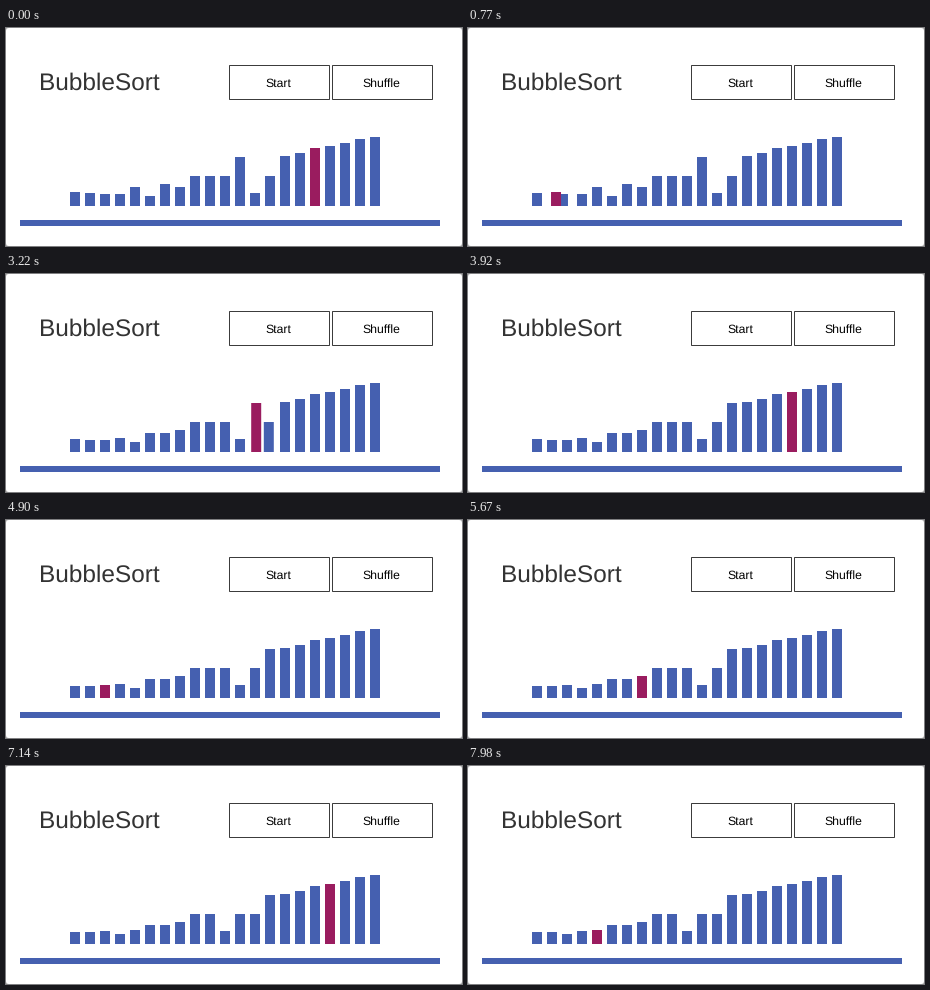
Animation, 456 px wide and 218 px high, one loop 8000 ms. Source, as a matplotlib script:

```python
import matplotlib.pyplot as plt
from matplotlib.animation import FuncAnimation
from matplotlib.patches import FancyBboxPatch, Rectangle

W, H, DPI = 456, 218, 64
LOOP, TICK, HOLD = 8000, 20, 70      # ms
STEP, SWAP_STEP, SLIDE = 112, 365, 250
BLUE, RED, INK = "#4560b0", "#9a1c5f", "#333333"
LEFT, PITCH, BAR_W, BASE = 64, 15, 10, 178

HEIGHTS = [14, 13, 12, 12, 19, 10, 22, 19, 30, 30, 30, 49, 13, 30,
           50, 53, 58, 60, 63, 67, 69]

plt.rcParams["text.hinting"] = "none"
fig = plt.figure(figsize=(W / DPI, H / DPI), dpi=DPI, facecolor="#b4b4b4")
ax = fig.add_axes([0, 0, 1, 1])
ax.set_xlim(0, W)
ax.set_ylim(H, 0)
ax.axis("off")


def label(x, y, text, px, color, align):
    ax.text(x, y, text, fontsize=px * 72 / DPI, family="Liberation Sans",
            color=color, ha=align, va="baseline")


def button(x, text):
    ax.add_patch(Rectangle((x, 37), 100, 34, fc="white", ec="#3c3c3c",
                           lw=72 / DPI, snap=True))
    label(x + 50, 58.5, text, 12.2, "black", "center")


def sort_steps(start, j):
    """List (time, index, order after the step, swapped) for the whole loop."""
    order, steps, t = list(range(len(HEIGHTS))), [], start
    while t < LOOP:
        swap = HEIGHTS[order[j - 1]] > HEIGHTS[order[j]]
        if swap:
            order[j - 1], order[j] = order[j], order[j - 1]
        steps.append((t, j, order[:], swap))
        t += SWAP_STEP if swap else STEP
        j = j + 1 if j < len(HEIGHTS) - 2 else 1
    return steps


ax.add_patch(FancyBboxPatch((0, 0), W, H, fc="white", ec="none",
                            boxstyle="round,pad=0,rounding_size=3"))
label(32.7, 62, "BubbleSort", 24.4, INK, "left")
button(222.5, "Start")
button(325.5, "Shuffle")
ax.add_patch(Rectangle((14, 192), 420, 6, fc=BLUE, ec="none"))

bars = [ax.add_patch(Rectangle((0, BASE - h), BAR_W, h, ec="none", snap=False))
        for h in HEIGHTS]
STEPS = sort_steps(-110, 16)


def draw(frame):
    now = (frame * TICK + TICK // 2) // HOLD * HOLD
    t, j, order, swap = [s for s in STEPS if s[0] <= now][-1]
    for slot, k in enumerate(order):
        bars[k].set(x=LEFT + PITCH * slot, facecolor=BLUE, zorder=2)
    active = bars[order[j]]
    active.set(facecolor=RED, zorder=3)
    if swap:
        left = PITCH * (1 - min(1, (now - t) / SLIDE))
        active.set_x(active.get_x() - left)
        other = bars[order[j - 1]]
        other.set_x(other.get_x() + left)
    return bars


anim = FuncAnimation(fig, draw, frames=LOOP // TICK, interval=TICK,
                     init_func=lambda: draw(0), repeat=True, repeat_delay=0)
plt.show()
```
